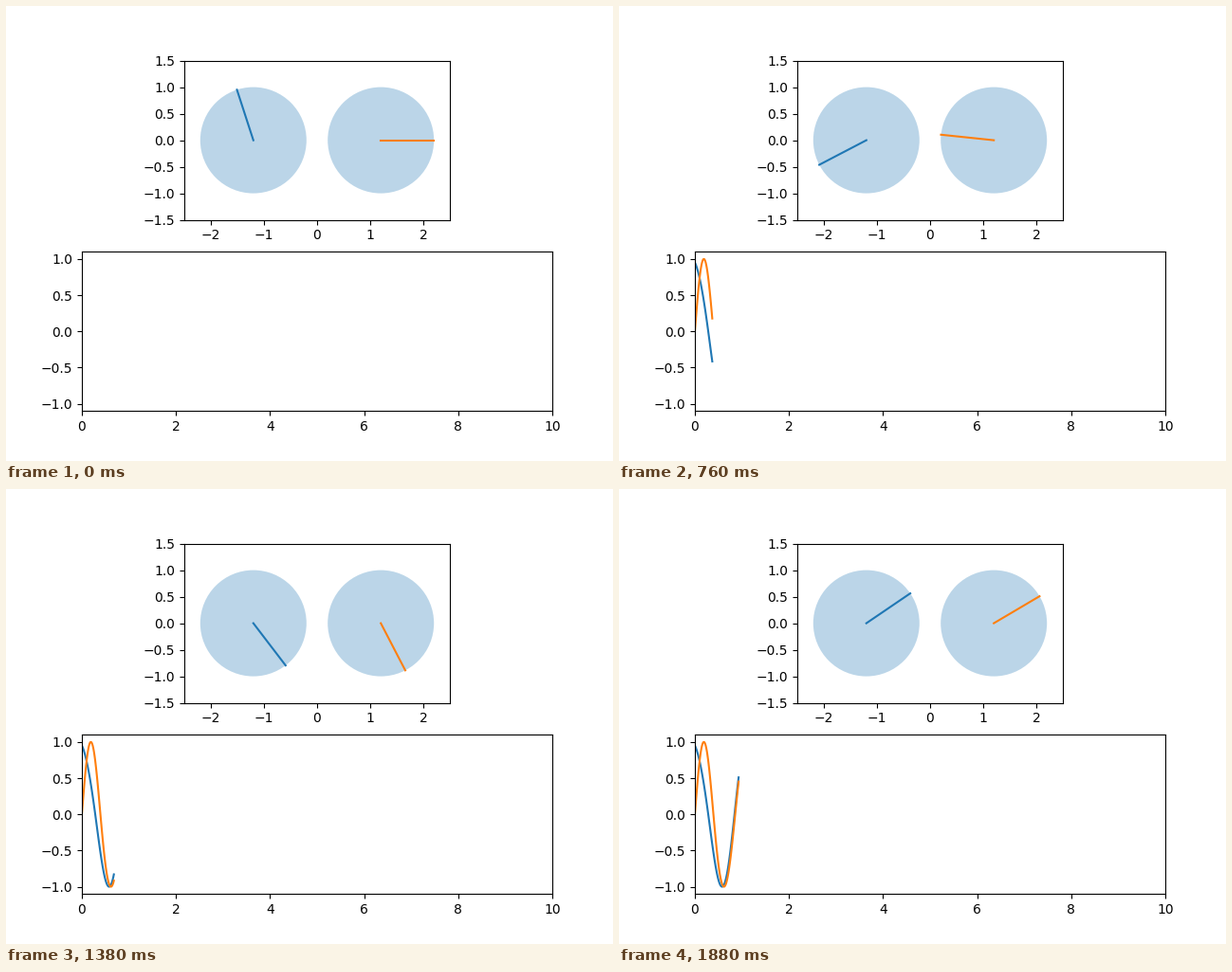
Recreate the animation shown at these times as a matplotlib script. Size 640 by 480 pixels, loop 1.9 s.

```python
import numpy as np
import matplotlib.pyplot as plt
from matplotlib.animation import FuncAnimation

FRAMES = 95
DT = 0.01
OMEGA = 2 * np.pi
COUPLING = 4
START_GAP = 0.6 * np.pi
CENTRES = (-1.2, 1.2)
COLORS = ("C0", "C1")


def phases(t):
    """Two equal oscillators whose phase gap obeys gap' = -COUPLING * sin(gap)."""
    mean = START_GAP / 2 + OMEGA * t
    half_gap = np.arctan(np.tan(START_GAP / 2) * np.exp(-COUPLING * t))
    return mean + half_gap, mean - half_gap


times = np.arange(FRAMES) * DT
angles = phases(times)

fig, (dials, chart) = plt.subplots(2, 1, figsize=(6.4, 4.8), dpi=100)

dials.set_aspect("equal")
dials.set_xlim(-2.5, 2.5)
dials.set_ylim(-1.5, 1.5)
chart.set_xlim(0, 10)
chart.set_ylim(-1.1, 1.1)

for x in CENTRES:
    dials.add_patch(plt.Circle((x, 0), 1, fc="C0", ec="none", alpha=0.3))

hands = [dials.plot([], [], color=c)[0] for c in COLORS]
waves = [chart.plot([], [], color=c)[0] for c in COLORS]


def update(i):
    for hand, wave, x, angle in zip(hands, waves, CENTRES, angles):
        hand.set_data([x, x + np.cos(angle[i])], [0, np.sin(angle[i])])
        wave.set_data(times[:i], np.sin(angle[:i]))
    return hands + waves


anim = FuncAnimation(fig, update, frames=FRAMES, interval=20,
                     repeat=True, repeat_delay=0)
plt.show()
```
